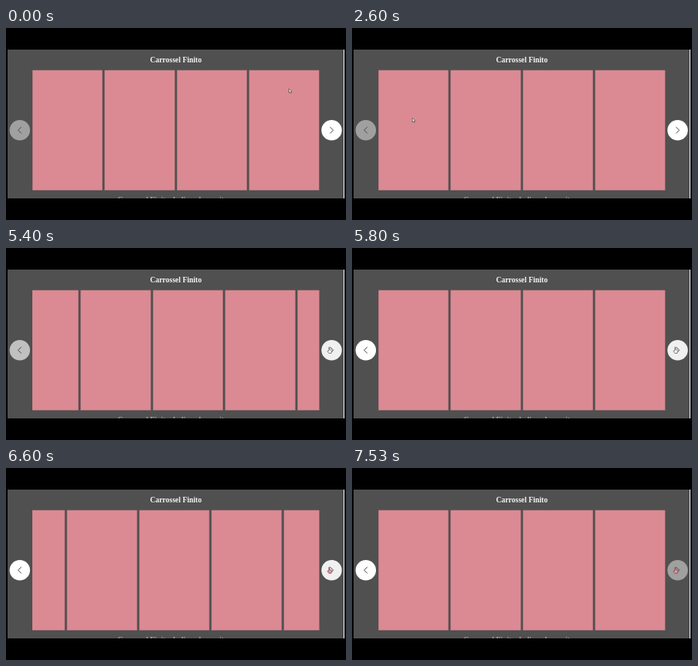
Recreate the animation shown at these times as an HTML page. Size 426x240 px, loop 8 s.

```html
<!DOCTYPE html>
<html lang="pt">
<head>
<meta charset="utf-8">
<title>Carrossel Finito</title>
<style>
  html, body { margin: 0; width: 100%; height: 100%; overflow: hidden; background: #000; }
  svg { display: block; width: 100%; height: 100%; }
  text { font: bold 9.4px "Liberation Serif", serif; text-anchor: middle; fill: #f4f4f4; }
  .chevron { fill: none; stroke: #444; }
</style>
</head>
<body>
<svg viewBox="0 0 426 240">
  <defs>
    <clipPath id="page"><rect x="2" y="27" width="422" height="186"/></clipPath>
    <clipPath id="window"><rect x="33" y="52.5" width="359.5" height="150.5"/></clipPath>
  </defs>
  <g clip-path="url(#page)">
    <rect x="2" y="27" width="422" height="186" fill="#505050"/>
    <rect x="423" y="27" width="1" height="186" fill="#f4f4f4"/>
    <text x="212.8" y="43">Carrossel Finito</text>
    <text x="213" y="218" opacity=".5">Carrossel Finito deslizando por itens</text>
    <g clip-path="url(#window)"><g id="track" fill="#db8a93" stroke="#b87880" stroke-width=".5"></g></g>
    <g id="previous">
      <circle cx="17.3" cy="127.7" r="12.8" fill="#fff"/>
      <path class="chevron" d="M19.2 123.7l-4 4 4 4"/>
    </g>
    <g id="next">
      <circle id="nextDisc" cx="408" cy="127.7" r="12.8" fill="#fff"/>
      <path class="chevron" d="M406 123.7l4 4-4 4"/>
    </g>
    <g id="cursor" stroke="#333" stroke-width=".6" stroke-linejoin="round">
      <path id="arrow" fill="#fff" d="M0 0v4.8l1.1-1 .9 1.8.9-.4-.8-1.8h1.5z"/>
      <path id="hand" d="M-.6 0q.6-.7 1.1 0v2.8l2.2.6q.6.3.4 1.2l-.5 2.6h-3.2l-1.8-2.5q.2-1 1.8-.2z"/>
    </g>
  </g>
</svg>
<script>
const LOOP = 8000, CARDS = 8, PITCH = 90.55, CARD = 87.5;
const SLIDE = 500, CLICKS = 4, FIRST_CLICK = 5293, CLICK_GAP = 578;

// Resting places of the pointer: time, x, y
const STOPS = [
  [840, 354.5, 76], [1200, 370, 64], [1640, 370, 64], [2600, 75.8, 112.6],
  [3500, 11, 139], [4070, 39.6, 134.6], [5000, 405, 124.3]
];

const get = id => document.getElementById(id);
const set = (id, name, value) => get(id).setAttribute(name, value);
const clamp = v => Math.min(1, Math.max(0, v));
const easeOut = p => 1 - (1 - p) ** 2;
const bezier = (a, b, u) => 3 * a * u * (1 - u) ** 2 + 3 * b * u * u * (1 - u) + u ** 3;

// CSS "ease": cubic-bezier(.25, .1, .25, 1)
function ease(p) {
  let low = 0, high = 1;
  for (let i = 0; i < 20; i++) {
    const mid = (low + high) / 2;
    if (bezier(.25, .25, mid) < p) low = mid; else high = mid;
  }
  return bezier(.1, 1, low);
}

const clickTime = i => FIRST_CLICK + i * CLICK_GAP;
const slideProgress = (t, i) => ease(clamp((t - clickTime(i)) / SLIDE));

function pointerAt(t) {
  let [, x, y] = STOPS[0];
  for (let i = 1; i < STOPS.length; i++) {
    const [start] = STOPS[i - 1], [end, nextX, nextY] = STOPS[i];
    const p = easeOut(clamp((t - start) / (end - start)));
    x += (nextX - x) * p;
    y += (nextY - y) * p;
  }
  return [x, y];
}

get('track').innerHTML = Array.from({ length: CARDS }, (_, i) =>
  `<rect x="${33.2 + i * PITCH}" y="52.8" width="${CARD}" height="150"/>`).join('');

function draw() {
  const t = performance.now() % LOOP;
  let slides = 0;
  for (let i = 0; i < CLICKS; i++) slides += slideProgress(t, i);
  set('track', 'transform', `translate(${-slides * PITCH} 0)`);
  set('previous', 'opacity', .46 + .54 * slideProgress(t, 0));
  set('next', 'opacity', 1 - .5 * slideProgress(t, CLICKS - 1));

  const [x, y] = pointerAt(t);
  const overNext = Math.hypot(x - 408, y - 127.7) < 12.8;
  const tinted = t >= clickTime(2);
  set('cursor', 'transform', `translate(${x} ${y})`);
  set('arrow', 'display', overNext ? 'none' : 'inline');
  set('hand', 'display', overNext ? 'inline' : 'none');
  set('hand', 'fill', tinted ? '#e0a0a8' : '#fff');
  set('hand', 'stroke', tinted ? '#7a2838' : '#444');
  set('nextDisc', 'fill', overNext ? '#f0f0f0' : '#fff');
  requestAnimationFrame(draw);
}
draw();
</script>
</body>
</html>
```
